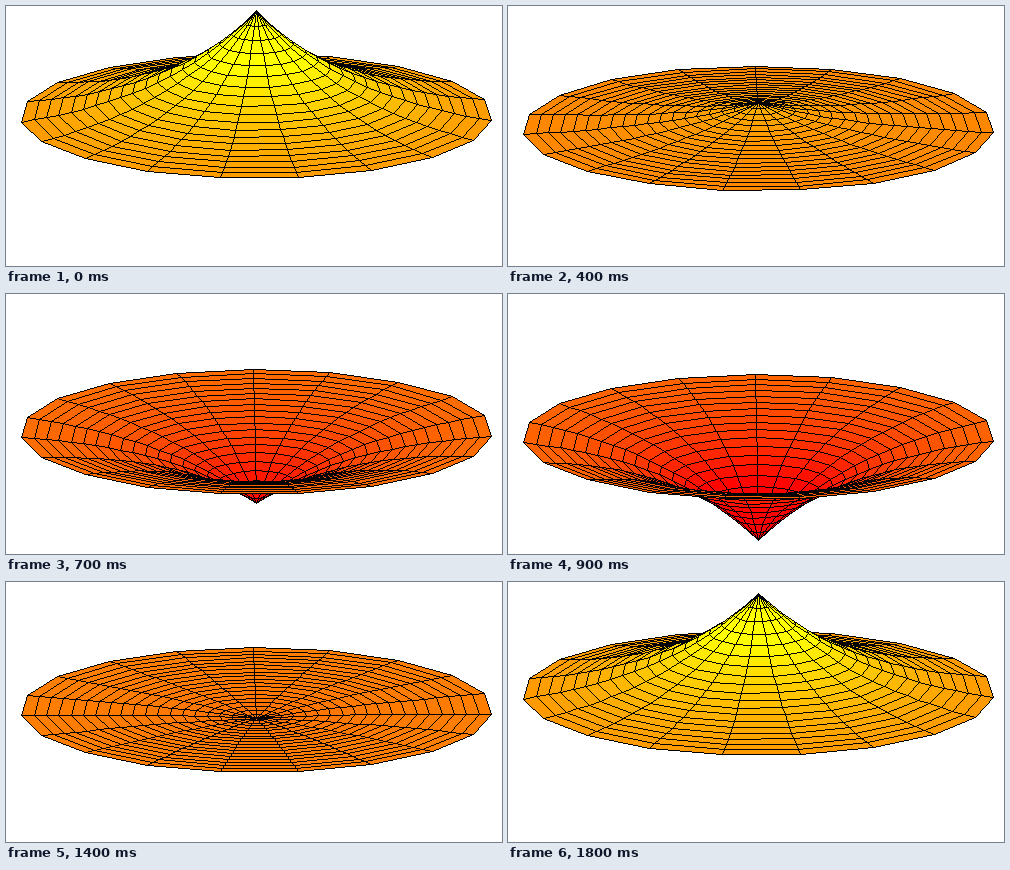
Write a matplotlib script that moves like this. It is 496 by 260 pixels and loops after 1.9 s.

```python
import numpy as np
import matplotlib.pyplot as plt
from matplotlib.animation import FuncAnimation
from matplotlib.path import Path

W, H, DPI = 496, 260, 100
FRAMES, INTERVAL = 19, 100
CELLS = 19                      # cells along the radius and around the circle
CX, CY = 250.5, 126.6           # centre of the resting membrane
RX, RY, LIFT = 235.8, 62.4, 121.9
TURN = np.radians(15)
COLOR_RANGE = 0.67

radius = np.linspace(0, 1, CELLS + 1)[:, None]
angle = TURN + np.linspace(0, 2 * np.pi, CELLS + 1)[None, :]
across = radius * np.cos(angle)
away = radius * np.sin(angle)
profile = np.exp(-2 * radius) * np.ones_like(angle)


def quads(grid):
    """Corner values of every cell, one row per cell, inner edge first."""
    corners = grid[:-1, :-1], grid[1:, :-1], grid[1:, 1:], grid[:-1, 1:]
    return np.stack([c.ravel() for c in corners], axis=1)


# Paint the far cells first.
order = np.argsort(-quads(away).mean(axis=1), kind="stable")
quad_x = quads(CX + RX * across)[order]
quad_away = quads(away)[order]
quad_profile = quads(profile)[order]


def fill(canvas, corners, color):
    left, top = corners.min(axis=0)
    right, bottom = corners.max(axis=0)
    ys, xs = np.mgrid[top:bottom + 1, left:right + 1]
    points = np.column_stack([xs.ravel(), ys.ravel()])
    x, y = points[Path(corners).contains_points(points)].T
    canvas[y, x] = color


def hairline(canvas, start, end):
    """A crisp line one pixel wide, the same in either direction."""
    (x0, y0), (x1, y1) = sorted([tuple(start), tuple(end)])
    count = max(x1 - x0, abs(y1 - y0)) + 1
    x = np.floor(np.linspace(x0, x1, count) + 0.5).astype(int)
    y = np.floor(np.linspace(y0, y1, count) + 0.5).astype(int)
    canvas[y, x] = 0


def render(frame):
    height = quad_profile * np.cos(2 * np.pi * frame / FRAMES)
    quad_y = CY - RY * quad_away - LIFT * height
    cells = np.floor(np.stack([quad_x, quad_y], axis=2)).astype(int)

    # Red below, orange at rest, yellow above; the inner edge sets the colour.
    greens = np.clip((height[:, 0] / COLOR_RANGE + 1) / 2, 0, 1) * 255

    canvas = np.full((H, W, 3), 255, dtype=np.uint8)
    for corners, green in zip(cells, greens):
        fill(canvas, corners, (255, round(green), 0))
        for start, end in zip(corners, np.roll(corners, -1, axis=0)):
            hairline(canvas, start, end)
    return canvas


fig = plt.figure(figsize=(W / DPI, H / DPI), dpi=DPI, facecolor="white")
ax = fig.add_axes([0, 0, 1, 1])
ax.axis("off")
picture = ax.imshow(render(0), extent=(0, W, H, 0), aspect="auto",
                    interpolation="nearest")


def draw(frame):
    picture.set_data(render(frame))
    return [picture]


anim = FuncAnimation(fig, draw, frames=FRAMES, interval=INTERVAL,
                     init_func=lambda: draw(0), repeat=True, repeat_delay=0)
plt.show()
```
